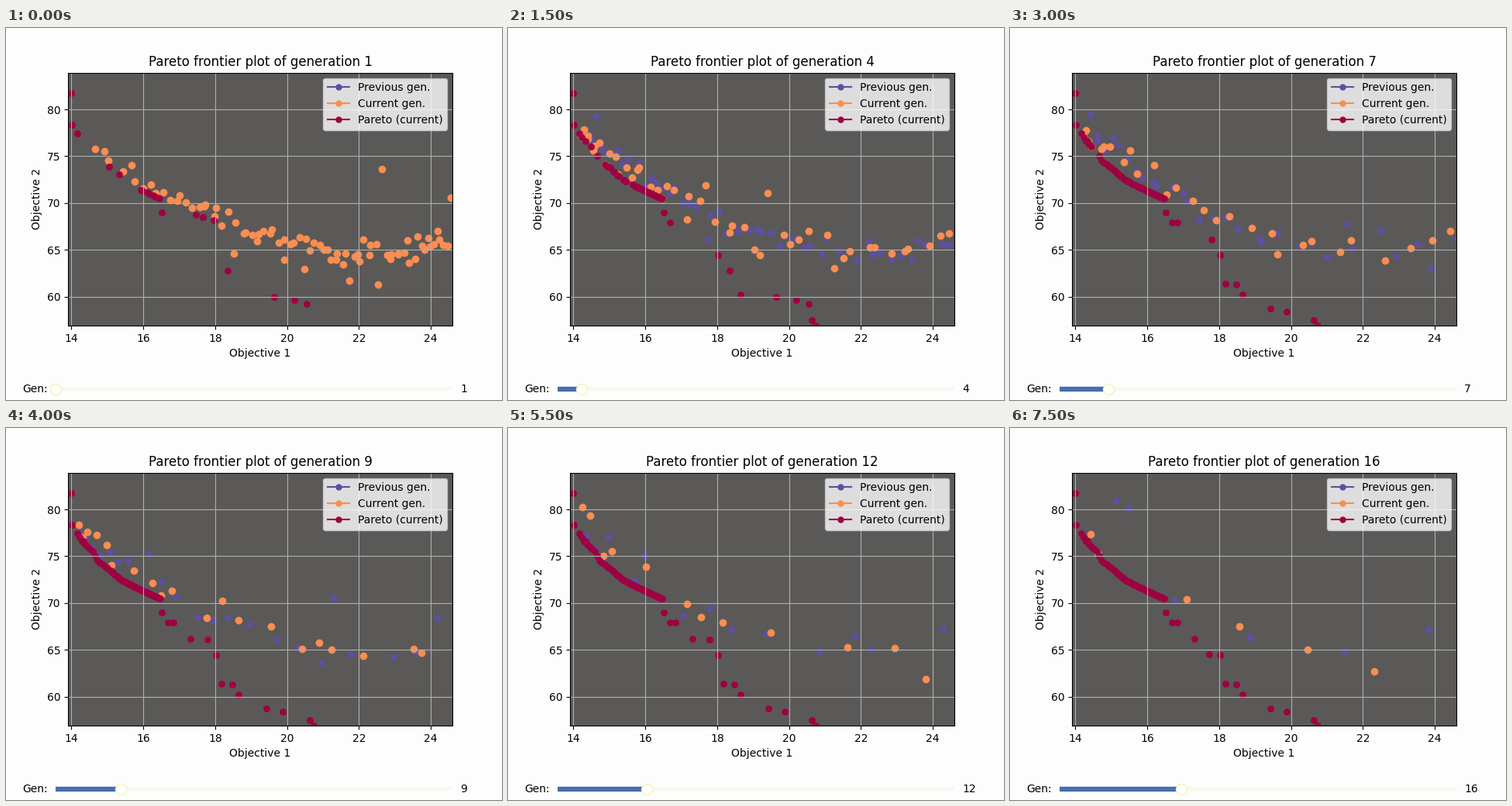
A matplotlib script that plays this animation: 640 px wide and 480 px high, repeating every 8000 ms.

```python
import numpy as np
import matplotlib.pyplot as plt
from matplotlib.animation import FuncAnimation
from matplotlib.lines import Line2D
from matplotlib.widgets import Slider

GENS = 16
PREV, CURR, BEST = "#5e4fa2", "#fb8d51", "#9e0142"
PAPER = "#fdfdfe"

# Lower bound that the front settles on
FRONT = [(13.99, 81.78), (14.01, 78.38), (14.16, 77.47), (14.36, 76.3),
         (14.59, 75.5), (14.72, 74.57), (15.13, 73.3), (15.37, 72.5),
         (15.73, 71.76), (16.51, 70.39), (16.52, 69.03), (16.8, 67.95),
         (18.0, 64.5), (20.7, 57)]
# Valley in which the offspring scatter
VALLEY = [(14.2, 77.5), (15.3, 74.4), (17.3, 69.7), (18.4, 67.6),
          (20.2, 65.7), (21.3, 64.8), (23, 64.6), (24.6, 66.3)]
# Isolated solutions right of the front's arm, by generation of discovery
TAIL = {
    1: [(16.51, 69.03), (17.46, 68.72), (17.65, 68.5), (17.95, 68.15),
        (18.34, 62.77), (19.64, 59.96), (20.2, 59.67), (20.54, 59.25)],
    3: [(16.68, 67.95), (18.02, 64.47), (18.64, 60.25), (20.63, 57.52),
        (20.73, 56.94)],
    6: [(16.83, 67.93), (17.78, 66.13), (18.17, 61.41), (18.47, 61.32),
        (19.42, 58.76), (19.87, 58.39)],
    8: [(17.31, 66.2)],
    14: [(17.72, 64.55)],
}


def curve(x, knots):
    return np.interp(x, *np.transpose(knots))


def make_archive():
    """Return all solutions ever found and the generation of each."""
    rng = np.random.default_rng(3)
    x = np.concatenate([[13.99, 14.01], np.linspace(14.16, 15.08, 14),
                        np.linspace(15.13, 16.51, 44)])
    born = np.where(x > 15.7, rng.integers(1, 5, x.size),
                    rng.integers(3, 9, x.size))
    born[:3] = 1
    pts, gens = [np.column_stack([x, curve(x, FRONT)])], [born]
    # rough solutions, soon dominated by better ones
    for g in range(1, 6):
        x = rng.uniform(14.2, 15.7, 4)
        pts.append(np.column_stack(
            [x, curve(x, FRONT) + 2 / g * rng.random(4)]))
        gens.append(np.full(4, g))
    for g, tail in TAIL.items():
        pts.append(tail)
        gens.append(np.full(len(tail), g))
    return np.vstack(pts), np.concatenate(gens)


def front(gen):
    pts = archive[found <= gen]
    no_worse = (pts[:, None] <= pts[None]).all(axis=2)
    better = (pts[:, None] < pts[None]).any(axis=2)
    return pts[~(no_worse & better).any(axis=0)]


def offspring(gen):
    """Scatter a population that shrinks and drifts left over time."""
    rng = np.random.default_rng(40 + gen)
    n = int(95 * np.exp(-0.17 * gen))
    u = (np.arange(n) + rng.random(n)) / n
    x = 14.2 + 10.4 * u ** (1.9 - 1.2 / gen)
    noise = np.clip(0.6 * rng.standard_t(2, n), -6, 9)
    y = np.maximum(curve(x, VALLEY) + noise, curve(x, FRONT))
    return np.column_stack([x, y])


archive, found = make_archive()
populations = [np.empty((0, 2))] + [offspring(g) for g in range(1, GENS + 1)]

fig, ax = plt.subplots(figsize=(6.4, 4.8), dpi=100, facecolor=PAPER)
fig.subplots_adjust(bottom=0.2)
ax.set(xlim=(13.903, 24.6), ylim=(56.9, 83.93), facecolor="#5a5958",
       xlabel="Objective 1", ylabel="Objective 2")
ax.set_xticks(range(14, 25, 2))
ax.set_yticks(range(60, 81, 5))
ax.grid(True)


def dots(color, edge):
    return ax.scatter([], [], s=36, color=color, linewidths=edge)


prev, curr, best = dots(PREV, 0.4), dots(CURR, 1), dots(BEST, 0.4)
names = ["Previous gen.", "Current gen.", "Pareto (current)"]
ax.legend(handles=[Line2D([], [], color=c, marker="o", markersize=5, label=n)
                   for c, n in zip((PREV, CURR, BEST), names)],
          loc="upper right")

slider = Slider(fig.add_axes([0.1, 0.02, 0.8, 0.02]), "Gen:", 1, 50,
                valinit=1, valstep=1, valfmt="%d", color="#466fb0",
                track_color="#f8f8ec", initcolor="none",
                handle_style={"facecolor": "white", "edgecolor": "#f4f4b8",
                              "size": 10})
slider.drawon = False


def update(i):
    gen = i + 1
    prev.set_offsets(populations[gen - 1])
    curr.set_offsets(populations[gen])
    best.set_offsets(front(gen))
    ax.set_title(f"Pareto frontier plot of generation {gen}")
    slider.set_val(gen)
    return prev, curr, best


anim = FuncAnimation(fig, update, frames=GENS, interval=500, repeat=True,
                     repeat_delay=0, blit=False)
plt.show()
```
